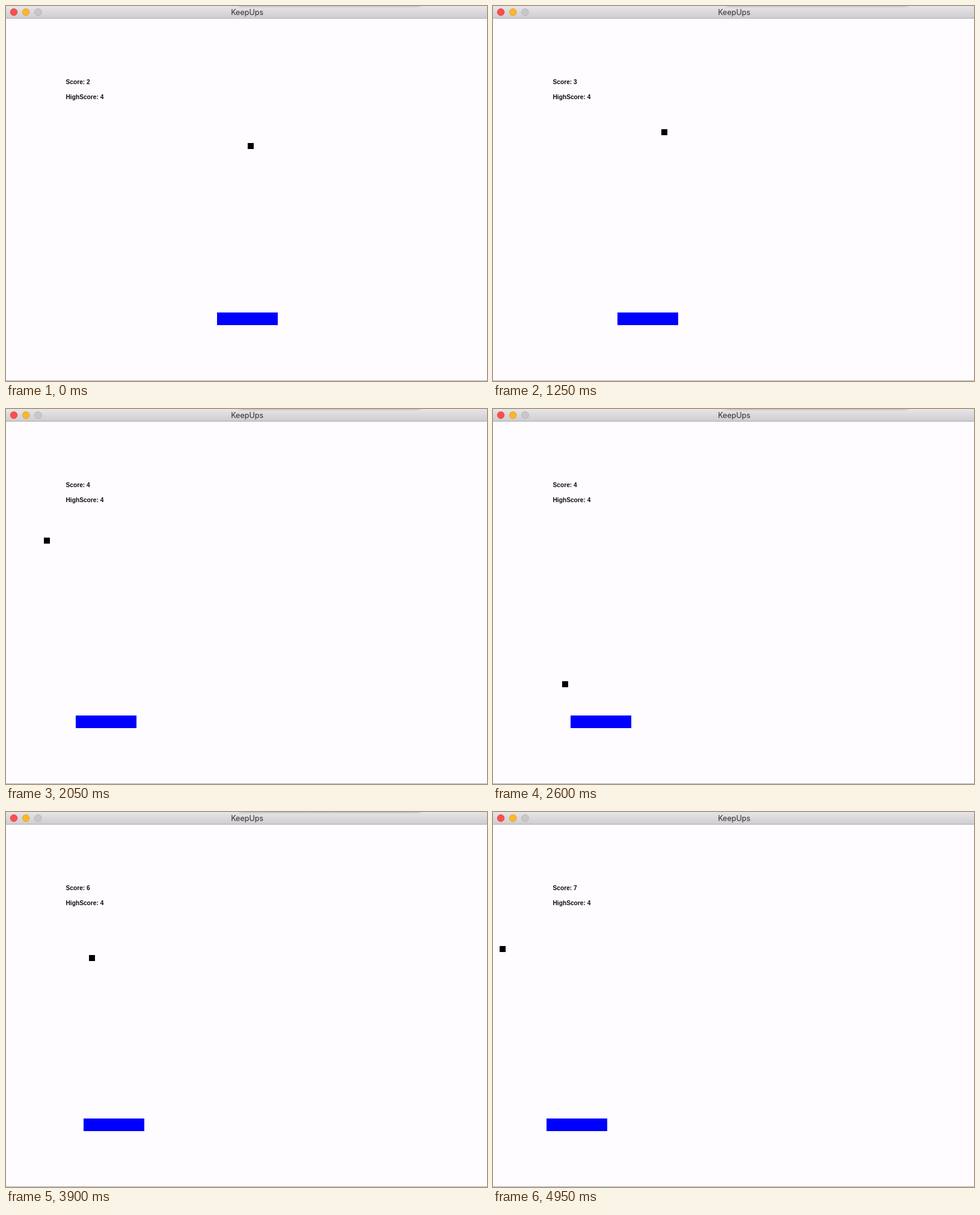
An HTML page for the animation above (5 s loop, 800 by 624 pixels).

```html
<!DOCTYPE html>
<html lang="en">
<head>
<meta charset="utf-8">
<title>KeepUps</title>
<style>
  html, body { margin: 0; width: 100%; height: 100%; overflow: hidden; background: #fefcff; }
  svg { display: block; width: 100vw; height: 100vh; }
  .title { font: 12.6px Inter, sans-serif; fill: #302e30; text-anchor: middle; }
  .score { font: bold 10.2px "Liberation Sans", Arial, sans-serif; fill: #0c0a0c; }
</style>
</head>
<body>
<svg viewBox="0 0 800 624" xmlns="http://www.w3.org/2000/svg">
  <defs>
    <linearGradient id="bar" x2="0" y2="1">
      <stop offset="0" stop-color="#e7e5e7"/>
      <stop offset="1" stop-color="#cfcdcf"/>
    </linearGradient>
    <filter id="soft" x="-10%" y="-200%" width="120%" height="500%">
      <feGaussianBlur stdDeviation="3 1.8"/>
    </filter>
  </defs>
  <rect width="800" height="624" fill="#fefcff"/>
  <rect width="800" height="20" fill="url(#bar)"/>
  <rect id="shade" x="388" y="-6" width="300" height="7" opacity=".22" filter="url(#soft)"/>
  <rect y="20" width="800" height="1" fill="#aeacae"/>
  <rect y="623" width="800" height="1" fill="#b0aeb0"/>
  <g stroke-width=".8">
    <circle cx="13" cy="10.2" r="5.8" fill="#fc4f4d" stroke="#de3a38"/>
    <circle cx="33.2" cy="10.2" r="5.8" fill="#fdb62b" stroke="#dd9a20"/>
    <circle cx="53.4" cy="10.2" r="5.8" fill="#c9c7c9" stroke="#aeacae"/>
  </g>
  <text class="title" x="401.2" y="15">KeepUps</text>
  <text class="score" x="99.5" y="130" id="score">Score: 2</text>
  <text class="score" x="99.5" y="155">HighScore: 4</text>
  <rect id="paddle" y="510" width="101" height="21" fill="#00f"/>
  <rect id="ball" width="10" height="10"/>
</svg>
<script>
const LOOP = 5000, TICK = 50, HOLD = 150;
const FLOOR = 504, GRAVITY = 0.0013;
const HOME = 351.4, STEP = 13.095, KEY_REPEAT = 25;

// Paddle hits: time and x; a negative x means the ball met the left wall on the way
const hits = [[-259, 403], [706, 401], [1673, 186], [2642, -129], [3607, 152], [4598, 104], [5564, -212]];

// Key presses: time and the step the paddle then walks to
const runs = [[400, 2], [925, -15], [1850, -18], [2275, -17], [2825, -21], [3425, -17], [4300, -20]];

const $ = id => document.getElementById(id);
const ball = $("ball"), paddle = $("paddle"), score = $("score"), shade = $("shade");

function place(el, x, y) {
  el.setAttribute("x", Math.round(x));
  if (y !== undefined) el.setAttribute("y", Math.round(y));
}

function paddleStep(t) {
  let at = 0;
  for (const [begin, goal] of runs) {
    const walked = Math.max(0, Math.floor((t - begin) / KEY_REPEAT));
    at += Math.sign(goal - at) * Math.min(walked, Math.abs(goal - at));
    if (t < begin) break;
  }
  return at;
}

function draw(ms) {
  const tick = Math.floor((ms % LOOP) / TICK) * TICK;
  const t = tick < HOLD ? 81 : tick;

  const next = hits.findIndex(([at]) => at > t);
  const [t0, x0] = hits[next - 1], [t1, x1] = hits[next];
  const from = Math.abs(x0);
  const x = Math.abs(from + (x1 - from) * (t - t0) / (t1 - t0));
  const y = FLOOR - GRAVITY * (t - t0) * (t1 - t);

  place(ball, x, y);
  place(paddle, HOME + STEP * paddleStep(t));
  score.textContent = "Score: " + (next + 1);
  shade.style.display = t < 4550 ? "" : "none";
}

const start = performance.now();
function loop() {
  draw(performance.now() - start);
  requestAnimationFrame(loop);
}
loop();
</script>
</body>
</html>
```
